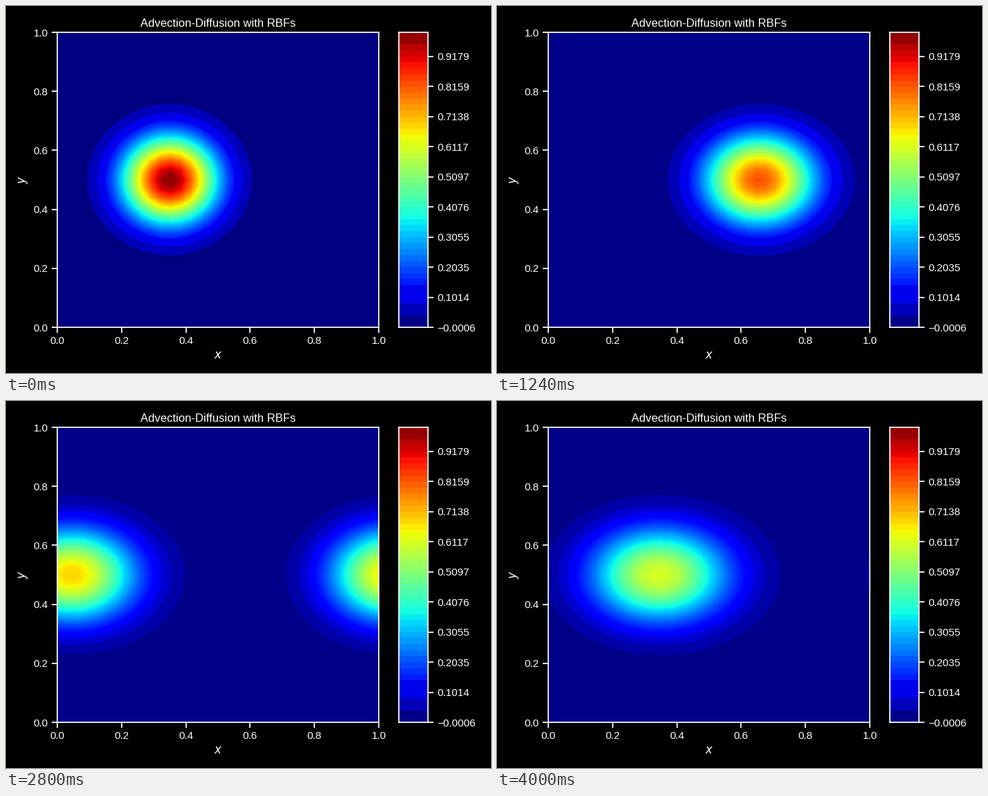
Animation, 700 px wide and 530 px high, one loop 4040 ms. Source, as a matplotlib script:

```python
import numpy as np
import matplotlib.pyplot as plt
from matplotlib.animation import FuncAnimation

W, H, DPI = 700, 530, 100
FRAMES, INTERVAL = 101, 40
CELLS = 34                       # grid cells per side
SPEED, DIFF, DT = 1.0, 0.001, 0.01
VMIN, VMAX = -0.00064, 0.99957

plt.rcParams.update({
    "font.family": "Liberation Sans",
    "font.size": 12,
    "axes.titlesize": 12,
    "axes.labelsize": 12,
    "axes.linewidth": 1.25,
    "axes.edgecolor": "white",
    "axes.labelcolor": "white",
    "text.color": "white",
})

# Backward Euler advection-diffusion, solved exactly in Fourier space
grid = np.linspace(0, 1, CELLS + 1)
X, Y = np.meshgrid(grid[:-1], grid[:-1])
dx = (X - 0.35 + 0.5) % 1 - 0.5
start = np.fft.fft2(np.exp(-50 * (dx**2 + (Y - 0.5)**2)))
k = 2 * np.pi * np.fft.fftfreq(CELLS, 1 / CELLS)
KX, KY = np.meshgrid(k, k)
growth = 1 / (1 + DT * (1j * KX * SPEED + DIFF * (KX**2 + KY**2)))


def field(n):
    u = np.fft.ifft2(start * growth**n).real
    return np.pad(np.maximum(u, 0), ((0, 1), (0, 1)), mode="wrap")


def jet(v):
    return plt.cm.jet(float(np.clip((v - VMIN) / (VMAX - VMIN), 0, 1)))


def bands(levels, merged):
    """Band edges and colours, with some neighbouring bands joined."""
    edges = [v for i, v in enumerate(levels) if i not in merged]
    step = levels[1] - levels[0]
    colors = []
    for lo, hi in zip(edges, edges[1:]):
        joined = hi - lo > 1.5 * step and lo < 0.5
        colors.append(jet(lo + (0.25 if joined else 0.5) * (hi - lo)))
    return edges, colors


BAR = np.linspace(VMIN, VMAX, 50)
WIDE = {1, 3, 5, 6, 48}
NARROW = {1, 3, 5}


def frame_bands(n, peak):
    if n == 0:
        edges, colors = bands(BAR, WIDE)
        colors[0] = "#000080"
        return edges, colors
    if peak > 0.765:
        return bands(np.arange(51) * 0.02, WIDE)
    return bands(np.arange(53) * 0.015, NARROW)


def box(x0, y0, x1, y1):
    return fig.add_axes([x0 / W, 1 - y1 / H, (x1 - x0) / W, (y1 - y0) / H])


fig = plt.figure(figsize=(W / DPI, H / DPI), dpi=DPI, facecolor="black")
tick_style = dict(length=6, width=1.25, pad=3.5, labelsize=11,
                  color="white", labelcolor="white")

ax = box(74, 38, 538, 464)
ax.set_facecolor("#00008b")
ax.set_title("Advection-Diffusion with RBFs", pad=6)
ax.set_xlabel("$x$")
ax.set_ylabel("$y$")
ax.tick_params(**tick_style)
ax.set(xlim=(0, 1), ylim=(0, 1))

cax = box(567, 38, 609, 464)
bar_edges, bar_colors = bands(BAR, WIDE)
for lo, hi, color in zip(bar_edges, bar_edges[1:], bar_colors):
    cax.axhspan(lo, hi, facecolor=color, edgecolor="none", antialiased=False)
cax.set(xlim=(0, 1), ylim=(VMIN, VMAX), xticks=[])
cax.yaxis.tick_right()
cax.set_yticks(BAR[::5], [f"{v:.4f}".replace("-", "\u2212") for v in BAR[::5]])
cax.tick_params(axis="y", **tick_style)

fills = []


def update(n):
    while fills:
        fills.pop().remove()
    u = field(n)
    edges, colors = frame_bands(n, u.max())
    edges[0] = -0.01
    fills.append(ax.contourf(grid, grid, u, levels=edges, colors=colors))
    ax.set(xlim=(0, 1), ylim=(0, 1))
    return fills


anim = FuncAnimation(fig, update, frames=FRAMES, interval=INTERVAL,
                     repeat=True, repeat_delay=0, blit=False)
plt.show()
```
